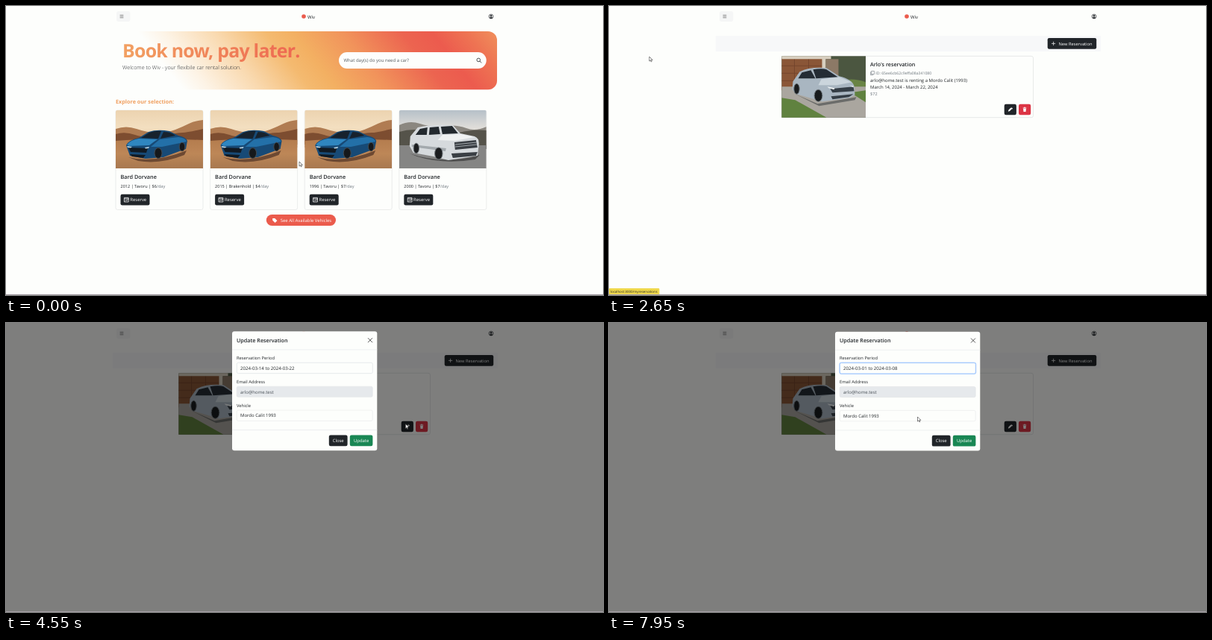
Write an HTML page that moves like this. It is 800 by 388 pixels and loops after 8000 ms.

```html
<!DOCTYPE html>
<html lang="en">
<head>
<meta charset="utf-8">
<title>Car rental walkthrough</title>
<style>
  html, body { margin: 0; height: 100%; overflow: hidden; background: #fdfefc; }
  svg { display: block; width: 100vw; height: 100vh; }
  text { font-family: "Open Sans", "Noto Sans", sans-serif; text-rendering: geometricPrecision; white-space: pre; }
</style>
</head>
<body>
<svg id="stage" viewBox="0 0 800 388">
  <defs>
    <linearGradient id="banner" x1="0" y1="0.12" x2="1" y2="0">
      <stop offset="0.07" stop-color="#fdfefc"/>
      <stop offset="0.14" stop-color="#fdf3e5"/>
      <stop offset="0.27" stop-color="#f9d9af"/>
      <stop offset="0.4" stop-color="#f4ba70"/>
      <stop offset="0.47" stop-color="#f3b062"/>
      <stop offset="0.6" stop-color="#f1935b"/>
      <stop offset="0.75" stop-color="#ec6450"/>
      <stop offset="0.83" stop-color="#ec5b4e"/>
      <stop offset="0.92" stop-color="#ee7453"/>
      <stop offset="1" stop-color="#f0905c"/>
    </linearGradient>
    <linearGradient id="headline">
      <stop offset="0" stop-color="#f2a163"/>
      <stop offset="1" stop-color="#ee6750"/>
    </linearGradient>
    <linearGradient id="dusk" x2="0" y2="1">
      <stop offset="0" stop-color="#ecd3b0"/>
      <stop offset="0.3" stop-color="#f3dfc0"/>
      <stop offset="1" stop-color="#d9a36e"/>
    </linearGradient>
    <linearGradient id="sand" x2="0" y2="1">
      <stop offset="0" stop-color="#b47c4e"/>
      <stop offset="0.5" stop-color="#bd8757"/>
      <stop offset="1" stop-color="#a87850"/>
    </linearGradient>
    <linearGradient id="cloud" x2="0" y2="1">
      <stop offset="0" stop-color="#b6c0c8"/>
      <stop offset="0.35" stop-color="#e6e2dc"/>
    </linearGradient>
    <clipPath id="photo"><path d="M0 78V2q0-2 2-2H115q2 0 2 2V78z"/></clipPath>

    <g id="coupe" clip-path="url(#photo)">
      <path fill="url(#dusk)" d="M0 0H117V78H0z"/>
      <path fill="#b07c52" d="M0 25Q14 20 28 25T56 30 80 26 98 18 117 13V50H0z"/>
      <path fill="#7d4d30" d="M0 32Q12 28 26 33T62 34 90 30 117 25V46H0z"/>
      <path fill="url(#sand)" d="M0 41Q50 37 117 40V78H0z"/>
      <path fill="#6d4932" d="M17 63Q50 72 95 54L92 60Q60 73 30 68z"/>
      <path fill="#174a76" d="M14 47Q17 40 31 37L44 29Q56 25 72 28L84 34Q94 36 96 41L94 52 88 54 64 63 40 65 19 61z"/>
      <path fill="#2f86c0" d="M15 46Q20 40 31 38L56 39Q50 43 45 47L18 48z"/>
      <path fill="#2370a8" d="M59 39 84 36Q94 37 95 42L86 44 62 49 47 49z"/>
      <path fill="#17222d" d="M34 37 45 30Q54 27 61 28L57 38zM60 38 64 29Q74 29 80 34z"/>
      <path fill="#111a23" d="M17 50 43 51 41 57 20 56zM19 59 40 60 37 64 22 62z"/>
      <path fill="#b9d3e2" d="M15 48 22 49 20 50.5 16 50zM39 50 45 49 44 51 40 51.5z"/>
      <g fill="#15181b" stroke="#444c52"><ellipse cx="57" cy="57.5" rx="5" ry="7"/><ellipse cx="89" cy="49" rx="3.8" ry="5.8"/></g>
    </g>

    <g id="suv" clip-path="url(#photo)">
      <path fill="url(#cloud)" d="M0 0H117V78H0z"/>
      <path fill="#8b8780" d="M0 20Q14 13 28 18T60 21 90 24 117 22V52H0z"/>
      <path fill="#55534a" d="M0 29Q20 23 40 29T80 30 117 27V52H0z"/>
      <path fill="#858584" d="M0 47H117V78H0z"/>
      <path fill="#4e4e4e" d="M14 58Q60 74 108 60L102 66Q60 73 24 62z"/>
      <path fill="#d6dadd" d="M15 35 25 23Q46 18 72 20L82 31 101 35Q107 37 107 45L105 61 66 67 46 62 19 57 14 48z"/>
      <path fill="#f0f2f2" d="M58 33 83 32 101 36 75 41 52 40z"/>
      <path fill="#23292e" d="M22 33 28 25 38 23 37 33zM40 33 41 23 53 22 55 32zM58 32 56 22 71 21 79 31z"/>
      <path fill="#3a3f44" d="M74 43 103 40 105 50 75 53zM70 58 105 56 103 61 72 64z"/>
      <path stroke="#b9bfc3" stroke-width="0.8" d="M75 46 104 43M75 49 104 46"/>
      <path fill="#a3a9ad" d="M17 46 63 51 62 55 17 49z"/>
      <g fill="#1b1d1f" stroke="#70767a"><ellipse cx="53" cy="58" rx="5.2" ry="8"/><ellipse cx="23" cy="51" rx="3.7" ry="6.8"/></g>
    </g>

    <g id="hatchback">
      <path fill="#4b5640" d="M0 0H112.5V82.5H0z"/>
      <path fill="#8a5637" d="M0 3H58V46H0z"/>
      <path stroke="#70432b" stroke-width="0.8" d="M0 13H54M0 23H54M0 33H54M17 3V44M36 3V44"/>
      <path fill="#d8cfc0" d="M0 0H66V4H0zM54 4H59V43H54z"/>
      <path fill="#8c7966" d="M59 4H76V38H59z"/>
      <path fill="#698344" d="M76 34Q94 28 112.5 35V60H76z"/>
      <path fill="#aaa69f" d="M0 41H112.5V82.5H0z"/>
      <path fill="#60823f" d="M0 56 18 59 60 82.5H0zM92 49 112.5 46V62z"/>
      <path fill="#6b6c6a" d="M18 51 48 64 100 55 98 59 50 67z"/>
      <path fill="#a9b6c1" d="M15 34 24 21Q38 14 60 16L77 27Q94 31 97 40L98 52 91 56 54 61 20 51 14 45z"/>
      <path fill="#cbd5dc" d="M53 31 77 28 94 35 74 39 49 39z"/>
      <path fill="#242c34" d="M22 30 27 22 39 19 45 30zM46 30 42 18Q54 16 60 18L75 28z"/>
      <path fill="#353e46" d="M65 44 96 41 97 47 68 49zM66 54 96 51 90 55 68 58z"/>
      <path fill="#edf2f4" d="M61 41 71 43 70 45 63 43zM91 40 96 40 96 42z"/>
      <g fill="#191c1e" stroke="#70797f"><ellipse cx="49" cy="53" rx="5.4" ry="8"/><ellipse cx="20" cy="44" rx="3.7" ry="7"/></g>
    </g>
  </defs>
</svg>

<script>
const LOOP = 8000;
const INK = '#212529', RED = '#eb5b4c', BLUE = '#569ff7';
const BRAND = 'Wiv', EMAIL = 'arlo@home.test', CAR = 'Mordo Calit';
const OPENED = 950, NAVIGATED = 2600, MODAL = 4140, CALENDAR = 5300,
      FIRST_PICK = 6350, HOVER_END = 6850, SECOND_PICK = 7250;

const text = (x, y, size, value, attrs = '') =>
  `<text x="${x}" y="${y}" font-size="${size}" fill="${INK}" ${attrs}>${value}</text>`;
const rect = (x, y, w, h, fill, r = 0, attrs = '') =>
  `<rect x="${x}" y="${y}" width="${w}" height="${h}" rx="${r}" fill="${fill}" ${attrs}/>`;
const line = (d, color, width = 0.8) =>
  `<path d="${d}" fill="none" stroke="${color}" stroke-width="${width}" stroke-linecap="round" stroke-linejoin="round"/>`;
const group = (id, content) => `<g id="${id}">${content}</g>`;
const cross = (x, y) => line(`M${x - 2.7} ${y - 2.7}l5.4 5.4m0-5.4l-5.4 5.4`, '#444', 0.9);
const calendarIcon = (x, y, color) =>
  line(`M${x} ${y}h5.4v5.6h-5.4zM${x} ${y + 1.5}h5.4M${x + 1} ${y + 4.2}l1.2-1 1 .6 1.6-1.4`, color, 0.75);

const SEMI = 'font-weight="600"', BOLD = 'font-weight="700"', WHITE = 'style="fill:#fff"';
const MUTED = 'style="fill:#6c757d"', MIDDLE = ' text-anchor="middle" ';

const header = () =>
  rect(148, 7, 18.5, 14, '#f5f6f6', 3, 'id="burger"') +
  line('M153 12.2h4M153 14h4M153 15.8h4', '#555', 0.6) +
  `<circle cx="399" cy="14" r="2.8" fill="${RED}"/>` +
  text(404, 16.5, 6, BRAND) +
  `<circle cx="650" cy="14" r="2.9" fill="none" stroke="${INK}" stroke-width=".7"/>
   <circle cx="650" cy="13.2" r="1.2" fill="${INK}"/><path d="M647.9 16q2.1-2.4 4.2 0-2 1.7-4.2 0" fill="${INK}"/>`;

function vehicleCard(x, year, maker, price, photo) {
  return rect(x, 140, 117, 133.5, '#fdfefc', 2.5, 'stroke="#dfe1e1" stroke-width=".6"') +
    `<use href="#${photo}" transform="translate(${x} 140)"/>` +
    text(x + 6.5, 232.2, 7.3, 'Bard Dorvane', SEMI) +
    text(x + 6.5, 244.2, 5.56, `${year} | ${maker} | $${price}<tspan fill="#6c757d">/day</tspan>`) +
    rect(x + 6.5, 252.7, 39, 14.8, INK, 2.2) +
    calendarIcon(x + 11.8, 257.4, '#fff') +
    text(x + 19.3, 262.3, 5.95, 'Reserve', WHITE);
}

const homePage = () =>
  rect(147, 34, 511, 78.3, 'url(#banner)', 12) +
  text(156, 68.6, 24.9, 'Book now, pay later.', BOLD + ' letter-spacing="-.75" style="fill:url(#headline)"') +
  text(156, 85.2, 7.15, `Welcome to ${BRAND} - your flexibile car rental solution.`, 'font-weight="300"') +
  rect(446, 62, 197.7, 22, '#fdfefc', 11) +
  text(452.5, 75.3, 6.05, 'What day(s) do you need a car?', 'style="fill:#555b60"') +
  `<circle cx="633.2" cy="72.4" r="2.3" fill="none" stroke="${INK}" stroke-width=".8"/>` +
  line('M635 74.2l1.9 1.9', INK, 0.8) +
  text(147, 130.7, 7.25, 'Explore our selection:', BOLD + ' style="fill:#f0a061"') +
  vehicleCard(147, 2012, 'Tavoru', 6, 'coupe') +
  vehicleCard(273.6, 2015, 'Brakenhold', 4, 'coupe') +
  vehicleCard(400.2, 1996, 'Tavoru', 7, 'coupe') +
  vehicleCard(526.8, 2000, 'Tavoru', 7, 'suv') +
  rect(348.8, 280, 93.2, 15, RED, 7.5) +
  '<path d="M357.2 285h3l3.2 3.2-2.9 2.8-3.3-3.2z" fill="#fff"/>' +
  text(367.7, 289.8, 5.95, 'See All Available Vehicles', WHITE);

const trash = (x, y) =>
  `<path d="M${x - 2.3} ${y - 2.5}h4.6v1h-4.6zM${x - 0.8} ${y - 3.2}h1.6v.8h-1.6zM${x - 1.9} ${y - 1.1}h3.8l-.4 4.2h-3z" fill="#fff"/>`;
const pencil = (x, y) =>
  `<path d="M${x - 2.8} ${y + 2.8}l.7-2.2 3-3 1.5 1.5-3 3zM${x + 1.3} ${y - 2.1}l.7-.7 1.5 1.5-.7.7z" fill="#fff"/>`;

const reservationsPage = () =>
  rect(143, 40, 516, 21, '#f7f8f9') +
  rect(587.7, 43, 65.5, 14.8, INK, 2.2) +
  line('M593.4 50.4h4.4m-2.2-2.2v4.4', '#fff', 0.7) +
  text(602.5, 52.6, 5.75, 'New Reservation', WHITE) +
  rect(231.5, 67.3, 337, 82.4, '#fdfefc', 2.5, 'stroke="#dfe1e1" stroke-width=".7"') +
  '<use href="#hatchback" transform="translate(231.5 67.3)"/>' +
  text(350, 81.2, 7.15, "Arlo's reservation", SEMI) +
  line('M350.6 88.7v4h3.3M352 87.4h3.4v4.1h-3.4z', '#6c757d', 0.6) +
  text(357.3, 92.3, 5.15, 'ID: 65ee6cb62c9effa08a341080', MUTED) +
  text(350, 101.6, 6, `${EMAIL} is renting a ${CAR} (1993)`) +
  text(350, 110.9, 6, 'March 14, 2024 - March 22, 2024') +
  text(350, 119.9, 5.6, '$72', MUTED) +
  rect(529.7, 131.8, 16.2, 14.5, INK, 2.2, 'id="edit"') + pencil(537.6, 139) +
  rect(549, 131.8, 16.2, 14.5, '#dc3545', 2.2) + trash(557, 139);

const menuPanel = () =>
  rect(0, 0, 156, 388, '#fdfefc') +
  text(6, 15.5, 7.4, 'Menu', SEMI) + cross(146.3, 12.3) +
  `<path d="M15.4 38.9l3.3-2.9 3.3 2.9h-.8v2.7h-5v-2.7z" fill="${INK}"/>` +
  `<path d="M15.6 54.6l1-2.3h4.2l1 2.3v2.7h-1v-.8h-4.2v.8h-1z" fill="${INK}"/>
   <path d="M17 53.1h3.4l.4 1.2h-4.2z" fill="#fff"/>` +
  calendarIcon(15.7, 68, INK) +
  ['Home', 'Vehicles Catalogue', 'My Reservations'].map((label, i) =>
    text(26.8, 41.2 + 16 * i, 5.85, label)).join('') +
  line('M6 46.7H150M6 62.5H150', '#e4e5e5', 0.6);

const modalPanel = () =>
  rect(303, 11.7, 194.3, 159.8, '#fdfefc', 3) +
  text(309, 26.4, 7.2, 'Update Reservation', SEMI) + cross(488, 23.5) +
  line('M303.3 36.2H497M303.3 144H497', '#e3e5e7', 0.6) +
  text(309, 49.4, 5.8, 'Reservation Period') +
  `<g id="focus">${rect(308.3, 52.6, 184, 16.4, '#c2dbfe', 3)}</g>` +
  rect(309.3, 53.6, 182, 14.4, '#fdfefc', 2, 'id="period" stroke="#86b7fe" stroke-width=".7"') +
  text(314, 63.2, 6.1, '', 'id="dates"') +
  text(309, 81.3, 5.8, 'Email Address') +
  rect(309.2, 85.5, 182, 14.2, '#e6e9ec', 2, 'stroke="#dcdfe2" stroke-width=".5"') +
  text(314, 94.9, 6, EMAIL, 'style="fill:#495057"') +
  text(309, 113.2, 5.8, 'Vehicle') +
  rect(309.2, 117.4, 182, 14.4, '#fdfefc', 2, 'stroke="#e6e8ea" stroke-width=".6"') +
  text(314, 126.8, 6, CAR + ' 1993') +
  rect(432.8, 150.8, 24.8, 14.8, INK, 2.2) + text(445.2, 160.3, 5.95, 'Close', MIDDLE + WHITE) +
  rect(460.8, 150.8, 30.6, 14.8, '#198754', 2.2) + text(476.1, 160.3, 5.95, 'Update', MIDDLE + WHITE);

function month(left, name, nameX, days, offset, start, end, endPicked) {
  const step = 17.25;
  let out = text(nameX, 80.2, 7, `${name} <tspan font-weight="300">2024</tspan>`, BOLD);
  ['Sun', 'Mon', 'Tue', 'Wed', 'Thu', 'Fri', 'Sat'].forEach((d, i) =>
    out += text(left + i * step, 89.6, 4.5, d, SEMI + MIDDLE));
  for (let d = 1; d <= days; d++) {
    const cell = d - 1 + offset, x = left + cell % 7 * step, y = 101.2 + Math.floor(cell / 7) * 15.65;
    const picked = d === start || (d === end && endPicked);
    if (picked && start === end) out += `<circle cx="${x}" cy="${y}" r="7.8" fill="${BLUE}"/>`;
    else if (picked) {
      const side = d === start ? 1 : -1;
      out += `<path d="M${x + side * 7.8} ${y - 7.8}H${x}a7.8 7.8 0 0 ${side > 0 ? 0 : 1} 0 15.6H${x + side * 7.8}z" fill="${BLUE}"/>`;
    } else if (d > start && d <= end) out += rect(x - 8.65, y - 7.5, 17.3, 15, '#e2e4e3');
    else if (name === 'March' && d === 10)
      out += `<circle cx="${x}" cy="${y}" r="7.5" fill="none" stroke="#c8cdd3" stroke-width=".6"/>`;
    out += text(x, y + 2, 5.3, d, MIDDLE + (picked ? WHITE : 'style="fill:#454b50"'));
  }
  return out;
}

const datePicker = (start, end, endPicked) =>
  rect(308.5, 68.8, 242.3, 118.8, '#6f716f', 2.5, 'opacity=".5"') +
  '<path d="M315 69l2.6-2.8 2.6 2.8z" fill="#fdfefc"/>' +
  rect(309, 68.8, 241.3, 118, '#fdfefc', 2.2) +
  line('M316.5 75.8l-2.2 2.3 2.2 2.3M542.6 75.8l2.2 2.3-2.2 2.3', '#555', 0.8) +
  month(317.5, 'March', 348, 31, 5, start, end, endPicked) +
  month(437.8, 'April', 471, 30, 1, 0, 0, false);

const backdrop = id => rect(0, 0, 800, 388, '#000', 0, `id="${id}"`);

const stage = document.getElementById('stage');
stage.insertAdjacentHTML('beforeend',
  rect(0, 0, 800, 388, '#fdfefc') + header() +
  group('home', homePage()) + group('reservations', reservationsPage()) +
  backdrop('menuShade') + group('menu', menuPanel()) +
  backdrop('modalShade') + group('modal', modalPanel()) +
  group('oldRange', datePicker(14, 22, true)) +
  group('firstDay', datePicker(1, 1, true)) +
  group('newRange', datePicker(1, 8, false)) +
  group('status', rect(0, 379, 67.5, 9, '#efd84c', 1) + text(2, 385.2, 4.4, 'localhost:3000/myreservations')) +
  rect(0, 387, 800, 1, '#a69fa6') +
  group('arrow', '<path d="M0 0v6.1l1.4-1.3 1 2.1 1-.5-1-2h2z" fill="#fff" stroke="#222" stroke-width=".55"/>') +
  group('hand', '<path d="M-.6.4q.7-1 1.3 0v2.5l2.6.6q.7.2.6 1l-.6 2.8h-3.4l-2-2.8q-.1-.8.7-.6l.8.7z" fill="#fff" stroke="#222" stroke-width=".55"/>'));

const el = {};
stage.querySelectorAll('[id]').forEach(node => el[node.id] = node);

const clamp = v => Math.max(0, Math.min(1, v));
const progress = (t, start, length) => clamp((t - start) / length);
const easeOut = p => 1 - (1 - p) ** 2;
const easeInOut = p => p * p * (3 - 2 * p);
const show = (id, on) => el[id].style.display = on ? '' : 'none';
const between = (t, a, b) => t >= a && t < b;

// Pointer stops: time, x, y
const path = [
  [0, 393, 209], [100, 393, 209], [650, 157, 15], [1000, 157, 15], [1500, 136, 24],
  [1650, 132, 27], [2350, 54, 68], [2800, 54, 68], [3850, 538, 136.5], [4500, 538, 136.5],
  [5200, 367.5, 69], [5700, 367.5, 69], [6250, 403, 101], [6500, 403, 101],
  [6950, 403, 117], [7300, 403, 117], [7900, 413.5, 126], [LOOP, 413.5, 126]
];

function pointerAt(t) {
  const i = path.findIndex(stop => stop[0] > t);
  const [t0, x0, y0] = path[i - 1], [t1, x1, y1] = path[i];
  const p = easeInOut((t - t0) / (t1 - t0));
  return [x0 + (x1 - x0) * p, y0 + (y1 - y0) * p];
}

function draw(t) {
  const menuOpen = between(t, OPENED, NAVIGATED);
  show('home', t < NAVIGATED);
  show('reservations', t >= NAVIGATED);
  show('menu', menuOpen);
  show('menuShade', menuOpen);
  el.menu.setAttribute('transform', `translate(${-156 * (1 - easeOut(progress(t, OPENED, 300)))} 0)`);
  el.menuShade.setAttribute('opacity', 0.5 * progress(t, OPENED, 150));
  el.burger.setAttribute('fill', between(t, 600, 1050) ? '#f0f1f1' : '#f5f6f6');
  show('status', between(t, 2300, 2900));

  const enter = progress(t, MODAL + 150, 300);
  show('modalShade', t >= MODAL);
  el.modalShade.setAttribute('opacity', 0.5 * progress(t, MODAL, 150));
  show('modal', enter > 0);
  el.modal.setAttribute('transform', `translate(0 ${-20 * (1 - easeOut(enter))})`);
  el.modal.setAttribute('opacity', clamp(enter * 2));
  el.edit.setAttribute('fill', between(t, 3800, 4550) ? '#424649' : INK);
  show('focus', t >= CALENDAR);
  el.period.setAttribute('stroke', t >= CALENDAR ? '#86b7fe' : '#dee2e6');
  el.dates.textContent = t < FIRST_PICK ? '2024-03-14 to 2024-03-22'
    : t < SECOND_PICK ? '2024-03-01' : '2024-03-01 to 2024-03-08';

  show('oldRange', between(t, CALENDAR, FIRST_PICK));
  el.oldRange.setAttribute('opacity', easeOut(progress(t, CALENDAR, 200)));
  show('firstDay', between(t, FIRST_PICK, HOVER_END));
  show('newRange', between(t, HOVER_END, SECOND_PICK));

  const hand = between(t, 620, 1050) || between(t, 3800, 4550) || between(t, 6150, SECOND_PICK);
  show('hand', hand);
  show('arrow', !hand);
  el[hand ? 'hand' : 'arrow'].setAttribute('transform', `translate(${pointerAt(t)})`);
}

function tick() {
  draw(performance.now() % LOOP);
  requestAnimationFrame(tick);
}
tick();
</script>
</body>
</html>
```
